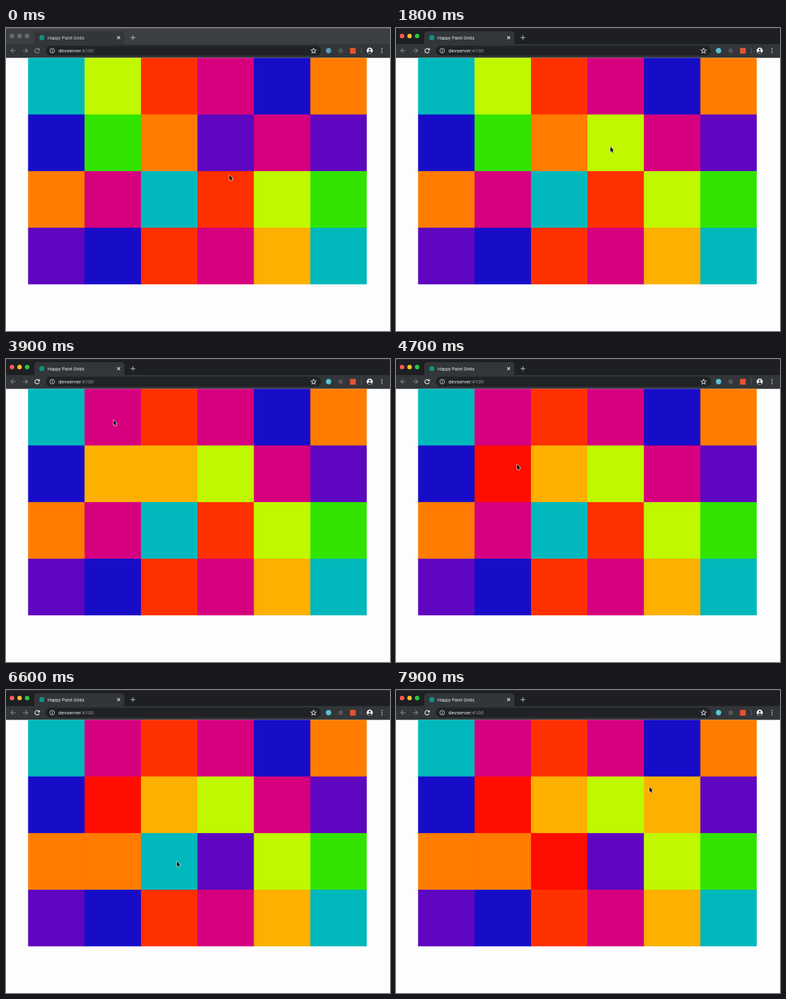
Animation of 600x472 px, one loop 8000 ms. Source, as an HTML page with a canvas:

```html
<!DOCTYPE html>
<html lang="en">
<head>
<meta charset="utf-8">
<title>Happy Paint Grids</title>
<style>
html, body { margin: 0; width: 100%; height: 100%; overflow: hidden; background: #fefdfe; }
canvas { display: block; width: 600px; height: 472px; }
</style>
</head>
<body>
<canvas id="stage"></canvas>
<script>
const W = 600, H = 472, LOOP = 8000, STEP = 100;
const LEFT = 34.5, TOP = 46.5, CELL = 88.2;
const FOCUS = 700, MOVE = 400, CLICK_DELAY = 100;
const MID = 35.3; // toolbar centre line

const canvas = document.getElementById('stage');
const scale = window.devicePixelRatio || 1;
canvas.width = W * scale;
canvas.height = H * scale;
const ctx = canvas.getContext('2d');

const colors = {
  teal: '#00b8bc', lime: '#bff800', flame: '#ff3000', magenta: '#d6007f', blue: '#170dc8',
  orange: '#ff7c00', green: '#30e400', purple: '#5f07c0', amber: '#fdb000', scarlet: '#ff0d00'
};
const startRows = [
  'teal lime flame magenta blue orange',
  'blue green orange purple magenta purple',
  'orange magenta teal flame lime green',
  'purple blue flame magenta amber teal'
];

// The pointer arrives at each stop and recolors the box under it.
const home = { x: 349, y: 229 };
const stops = [
  { at: 1400, x: 335, y: 185, paint: 'lime' },
  { at: 2300, x: 245, y: 180, paint: 'amber' },
  { at: 2800, x: 153, y: 178, paint: 'amber' },
  { at: 3700, x: 168, y: 95, paint: 'magenta' },
  { at: 4500, x: 189, y: 164, paint: 'scarlet' },
  { at: 5100, x: 178, y: 264, paint: 'orange' },
  { at: 5500, x: 286, y: 280 },
  { at: 6000, x: 338, y: 268, paint: 'purple' },
  { at: 6600, x: 267, y: 267, paint: 'scarlet' },
  { at: 7600, x: 396, y: 151, paint: 'amber' }
];

function pointerAt(t) {
  let { x, y } = home;
  for (const s of stops) {
    const u = Math.min(1, Math.max(0, (t - s.at + MOVE) / MOVE));
    const k = u * u * (3 - 2 * u);
    x += (s.x - x) * k;
    y += (s.y - y) * k;
  }
  return { x, y };
}

function gridAt(t) {
  const grid = startRows.map(row => row.split(' '));
  for (const s of stops) {
    if (!s.paint || t < s.at + CLICK_DELAY) continue;
    grid[Math.floor((s.y - TOP) / CELL)][Math.floor((s.x - LEFT) / CELL)] = s.paint;
  }
  return grid;
}

function rect(x, y, w, h, color) {
  ctx.fillStyle = color;
  ctx.fillRect(x, y, w, h);
}

function round(x, y, w, h, r, color) {
  ctx.fillStyle = color;
  ctx.beginPath();
  ctx.roundRect(x, y, w, h, r);
  ctx.fill();
}

function dot(x, y, r, color) {
  ctx.fillStyle = color;
  ctx.beginPath();
  ctx.arc(x, y, r, 0, Math.PI * 2);
  ctx.fill();
}

function ring(x, y, r, color, width, from = 0, to = Math.PI * 2) {
  ctx.strokeStyle = color;
  ctx.lineWidth = width;
  ctx.beginPath();
  ctx.arc(x, y, r, from, to);
  ctx.stroke();
}

function line(color, ...pts) {
  ctx.strokeStyle = color;
  ctx.lineWidth = 1.1;
  ctx.beginPath();
  for (let i = 0; i < pts.length; i += 2) ctx.lineTo(pts[i], pts[i + 1]);
  ctx.stroke();
}

function text(str, x, y, size, color) {
  ctx.font = size + 'px Roboto, Arial, sans-serif';
  ctx.fillStyle = color;
  ctx.fillText(str, x, y);
  return x + ctx.measureText(str).width;
}

// Two crossed strokes; a quarter turn apart, starting at the given angle.
function cross(x, y, r, angle, color) {
  for (const a of [angle, angle + Math.PI / 2]) {
    const dx = r * Math.cos(a), dy = r * Math.sin(a);
    line(color, x - dx, y - dy, x + dx, y + dy);
  }
}

function arrow(x, dir, color) {
  const tip = x + 3.7 * dir;
  line(color, x - 3.7 * dir, MID, tip, MID);
  line(color, x, MID - 3.6, tip, MID, x, MID + 3.6);
}

function star(x, y, r) {
  const pts = Array.from({ length: 11 }, (_, i) => {
    const a = (i / 5 - 0.5) * Math.PI, d = i % 2 ? r * 0.45 : r;
    return [x + d * Math.cos(a), y + d * Math.sin(a)];
  });
  line('#c4c6c9', ...pts.flat());
}

function drawTabs(active) {
  rect(0, 0, W, 26, active ? '#1d1f22' : '#3b3e42');
  rect(0, 0, W, 1, active ? '#2c2e31' : '#595c60');
  const lights = active ? ['#fc5b57', '#fdbc2e', '#28c840'] : Array(3).fill('#686b6e');
  lights.forEach((c, i) => dot(9.4 + i * 11.8, 12.5, 3.5, c));
  round(44, 5, 141, 23, [5, 5, 0, 0], '#323639');
  dot(56, 15, 4, '#138f84');
  text('Happy Paint Grids', 65, 17.5, 7.2, active ? '#e8eaed' : '#d2d4d7');
  cross(176, 15, 3.2, Math.PI / 4, '#d5d7da');
  cross(198.3, 15, 3.8, 0, '#b4b6b9');
}

function drawToolbar(active) {
  rect(0, 25, W, TOP - 25, '#323639');
  const dim = '#85878a', bright = active ? '#e4e6e9' : dim, light = '#d8dadd';
  arrow(11.3, -1, dim);
  arrow(30.2, 1, dim);
  ring(48.7, MID, 3.4, bright, 1.2, 0.35, 5.5);
  ctx.fillStyle = bright;
  ctx.beginPath();
  ctx.moveTo(52.9, 31);
  ctx.lineTo(52.9, 34.8);
  ctx.lineTo(49.1, 34.8);
  ctx.fill();

  round(62, 27.5, 430, 15.5, 7.7, '#202225');
  ring(72.2, MID, 3.6, light, 0.9);
  rect(71.7, 34.7, 1, 2.6, light);
  rect(71.7, 33.1, 1, 1, light);
  const end = text('devserver', 82, 38.2, 8.1, '#eceef0');
  text(':4100', end, 38.2, 8.1, '#999ca0');
  star(480.6, 35.5, 4.3);

  dot(504, MID, 4.2, active ? '#58c3d4' : '#5d98b5');
  dot(523, MID, 3.7, '#505357');
  rect(537.5, 31, 9, 9, '#e4532f');
  rect(554.7, 30.5, 1, 9.5, '#55585c');

  dot(568.3, MID, 4.8, '#eff0f2');
  dot(568.3, MID - 1.6, 1.5, '#323639');
  round(565.4, MID + 1.2, 5.8, 3, 1.5, '#323639');
  for (let i = -1; i < 2; i++) dot(587.4, MID + i * 3.1, 0.9, light);
}

// Each box runs slightly under the next, so shared edges blend cleanly.
function drawBoxes(grid) {
  grid.forEach((row, r) => row.forEach((name, c) => {
    const w = CELL + (c < row.length - 1 ? 1 : 0);
    const h = CELL + (r < grid.length - 1 ? 1 : 0);
    rect(LEFT + c * CELL, TOP + r * CELL, w, h, colors[name]);
  }));
}

function drawPointer({ x, y }) {
  ctx.save();
  ctx.translate(x, y);
  const shape = new Path2D('M0 0V8L1.8 6.4 3.1 9.3 4.5 8.7 3.2 5.8 5.5 5.6Z');
  ctx.lineJoin = 'round';
  ctx.lineWidth = 1.2;
  ctx.strokeStyle = '#f4f4f4';
  ctx.stroke(shape);
  ctx.fillStyle = '#080808';
  ctx.fill(shape);
  ctx.restore();
}

function draw(t) {
  const active = t >= FOCUS;
  ctx.setTransform(scale, 0, 0, scale, 0, 0);
  rect(0, 0, W, H, '#fefdfe');
  drawTabs(active);
  drawToolbar(active);
  drawBoxes(gridAt(t));
  drawPointer(pointerAt(t));
}

const begin = performance.now();
function tick() {
  const t = (performance.now() - begin) % LOOP;
  draw(Math.floor(t / STEP) * STEP);
  requestAnimationFrame(tick);
}
tick();
</script>
</body>
</html>
```
